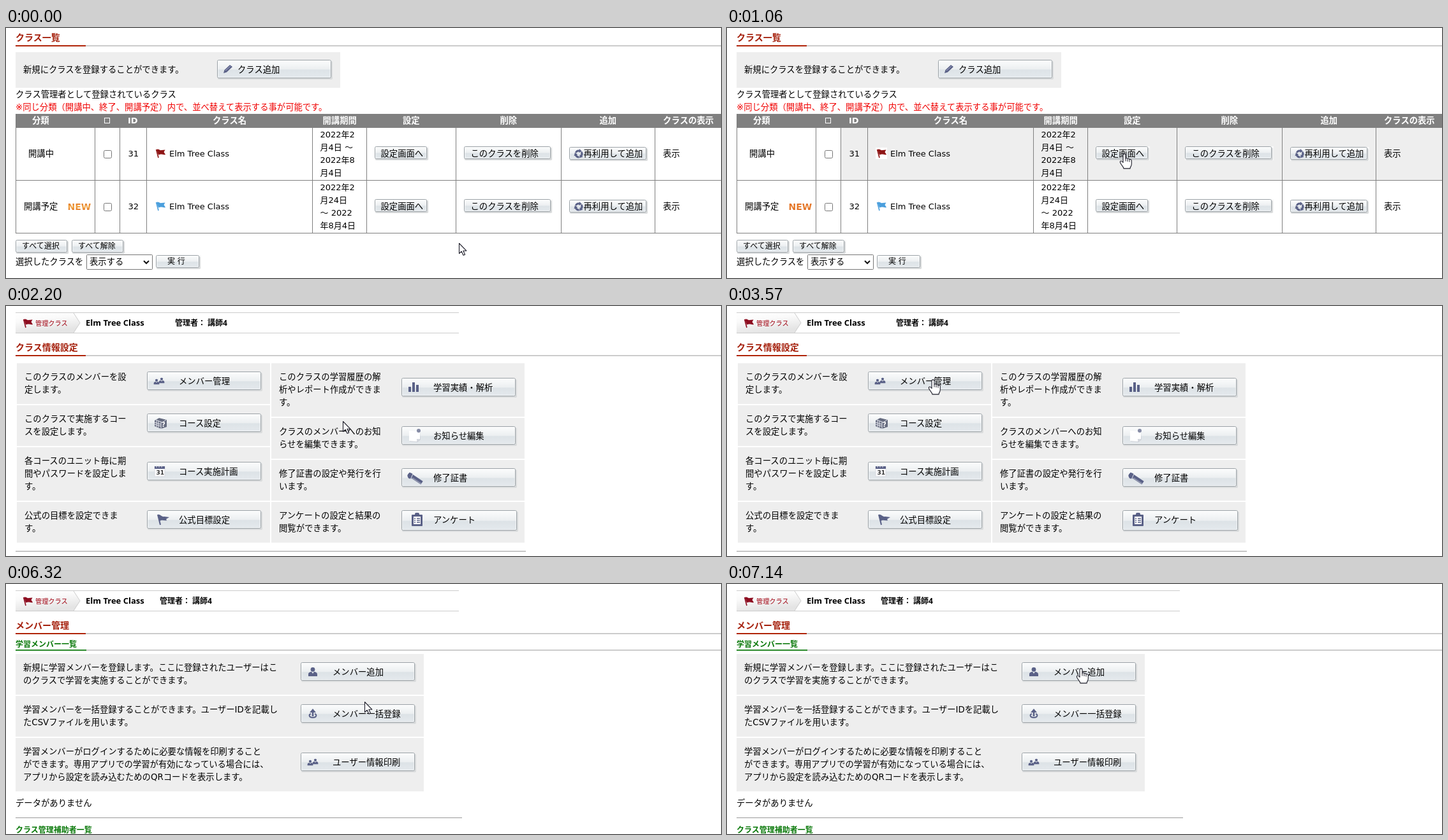
Animation of 1121 by 393 pixels, one loop 8 s. Source, as an HTML page:

```html
<!DOCTYPE html>
<html lang="ja">
<head>
<meta charset="utf-8">
<title>クラス管理</title>
<style>
html, body { margin: 0; width: 100%; height: 100%; overflow: hidden; background: #fff; }
svg { display: block; width: 1121px; height: 393px; }
text { font: 13.33px "DejaVu Sans", "Noto Sans CJK JP", "Noto Sans CJK", sans-serif; white-space: pre; }
.b { font-weight: 700; }
.t { font: 700 12px "Noto Sans", "Noto Sans CJK JP", "Noto Sans CJK", sans-serif; }
</style>
</head>
<body>
<svg id="stage" viewBox="0 0 1121 393" xmlns="http://www.w3.org/2000/svg"></svg>
<script>
const LOOP = 8000, INK = '#5a6187', RED = '#a5200c', GREEN = '#087808';
const CLASS_NAME = 'Elm Tree Class', TEACHER = '講師4';

// y is the vertical middle of the line
const text = (x, y, s, { size = 13.33, fill = '#000', cls = '' } = {}) =>
  `<text x="${x}" y="${y + size * .37}" class="${cls}" fill="${fill}" style="font-size:${size}px">${s}</text>`;
const lines = (x, y, ...rows) => rows.map((s, i) => text(x, y + i * 20, s)).join('');
const rect = (x, y, w, h, fill, extra = '') =>
  `<rect x="${x}" y="${y}" width="${w}" height="${h}" fill="${fill}" ${extra}/>`;
const path = (d, fill = INK, extra = '') => `<path d="${d}" fill="${fill}" ${extra}/>`;
const stroke = (d, color = INK, w = 1) => path(d, 'none', `stroke="${color}" stroke-width="${w}"`);
const circle = (x, y, r, fill = INK, extra = '') => `<circle cx="${x}" cy="${y}" r="${r}" fill="${fill}" ${extra}/>`;
const at = (x, y, body) => `<g transform="translate(${x} ${y})">${body}</g>`;
const group = (id, body) => `<g id="${id}">${body}</g>`;

const button = (x, y, w, h) =>
  rect(x + 1, y + 2, w + 1, h, '#d9dbdc', 'rx="2"') +
  rect(x + .5, y + .5, w - 1, h - 1, 'url(#face)', 'rx="2" stroke="#9aa1a6"') +
  rect(x + 1.5, y + 1.5, w - 3, h - 3, 'none', 'rx="1" stroke="#fff" stroke-opacity=".6"');
const smallButton = (x, y, w, label, tx, ty, size) =>
  rect(x, y, w + 3, 22, '#fafafa') + button(x, y, w, 20) + text(tx, ty, label, { size });
const flag = (x, y, color) => at(x, y,
  stroke('M.6 1L4 14', color, 1.6) + path('M1 1C4-1 6 3 9 2L14.5 1.5L12.5 5L15 9C11 10 9 7 4 9.5Z', color));
const heading = (y, s) => text(15, y, s, { size: 14, fill: RED, cls: 'b' }) +
  rect(125, y + 12, 996, 2, '#ccc') + rect(15, y + 12, 110, 2, '#b02408');

const person = (x, y, k = 1) => `<g transform="translate(${x} ${y}) scale(${k})">` +
  circle(0, -3.6, 3.4) + path('M-7 7V4C-7 1-4 0-2 0L0 3L2 0C4 0 7 1 7 4V7Z') + '</g>';
const people = (x, y) => person(x - 4, y + 1, .62) + person(x + 4, y - 1, .62);
const icons = {
  people, person,
  pencil: (x, y) => at(x, y, path('M-7 6L-5.5 1L3-7L7-4L-2 4.5Z') + stroke('M-4 2L4-5', '#aab0d0')),
  cube: (x, y) => at(x, y, path('M-7-4L0-8L12-5V6L3 9L-7 5Z', '#666c80') +
    stroke('M-7-1L3 2M-7 2L3 5M-4-4V6M-1-3V7M-5-5L5-1L11-5M3-2V9', '#e4e6ee') +
    text(4, 2.5, '?', { size: 10, fill: '#fff', cls: 'b' })),
  calendar: (x, y) => at(x, y, rect(-7, -8, 16, 16, '#fbfbfd', 'stroke="#ccced8" stroke-width=".6"') +
    rect(-7, -8, 16, 4, INK) + stroke('M-4-9V-6M0-9V-6M4-9V-6', '#dfe1ea') +
    text(-4.5, 2, '31', { size: 9, fill: '#333', cls: 'b' })),
  flag: (x, y) => at(x, y, stroke('M-2-8L2 8', INK, 2) + path('M-2-8C2-9 4-4 8-5L16-4L11-1L12 1C8 2 5-1 1 2Z')),
  bars: (x, y) => at(x, y, rect(-8, -1, 4, 8, INK) + rect(-2, -8, 4, 15, INK) + rect(4, -4, 4, 11, INK)),
  note: (x, y) => at(x, y, path('M-6-6L10-6L11 6L6 10L-6 9Z', '#b9bcc3', 'opacity=".5"') +
    path('M-7-8L10-7L10 5L5 9L-7 8Z', '#fff') + path('M5 9L5 5L10 5Z', '#d4d7df') + circle(8, -8, 3, '#858ba5')),
  scroll: (x, y) => at(x, y, stroke('M-8-6L13 8', INK, 6) + stroke('M-4-1L12 9.5', '#9298b0', 1.5) +
    circle(-5, -3, 4.5) + stroke('M-1-6L-5 3', '#dfe2ec')),
  clipboard: (x, y) => at(x + 5, y, rect(-8, -8, 17, 18, INK, 'rx="1"') + rect(-3, -11, 7, 5, INK, 'rx="2"') +
    rect(-5, -5, 11, 12, '#fff') + stroke('M-4-2H-2M0-2H5M-4 1H-2M0 1H5M-4 4H-2M0 4H5', INK, 1.6)),
  upload: (x, y) => at(x, y, path('M-5-2L0-8L5-2Z') + rect(-1.3, -3, 2.6, 7, INK) +
    stroke('M-3 0C-7 1-6 6 0 6C6 6 7 1 3 0', INK, 2)),
  recycle: (x, y) => at(x, y, [0, 120, 240].map(a => `<g transform="rotate(${a})">` +
    stroke('M-4.6-2A5 5 0 0 1 1-4.9', INK, 3) + path('M1-8L5-4L0-2Z') + '</g>').join(''))
};

// Class list
function listRow(y, id, status, sx, flagColor, dates) {
  const m = y + 41;
  return text(sx, m, status) + rect(153.5, m - 4.5, 12, 12, '#fff', 'rx="2" stroke="#767676"') +
    text(191.5, m, id, { size: 13 }) + rect(233, m - 9, 18, 18, '#fff') + flag(235, m - 7, flagColor) +
    text(256, m, CLASS_NAME, { size: 13 }) +
    dates.map((s, i) => text(492.5, y + 11 + i * 20, s, { size: 13 })).join('') +
    smallButton(578, y + 30, 82, '設定画面へ', 587.5, m) +
    smallButton(718, y + 30, 136, 'このクラスを削除', 728.5, m) +
    smallButton(883, y + 31, 121, '再利用して追加', 905.5, m) + icons.recycle(898, m + 1) +
    text(1030, m, '表示');
}
const heads = [[41, '分類'], [191, 'ID'], [324, 'クラス名'], [496.5, '開講期間'], [622, '設定'],
  [774.5, '削除'], [930.5, '追加'], [1030, 'クラスの表示']];
const listPage = heading(15, 'クラス一覧') + rect(15, 38, 509, 56, '#eee') +
  text(27, 65, '新規にクラスを登録することができます。') + button(331, 50, 179, 29) +
  icons.pencil(348, 65) + text(363, 65, 'クラス追加') +
  text(15, 104, 'クラス管理者として登録されているクラス') +
  text(15, 124, '※同じ分類（開講中、終了、開講予定）内で、並べ替えて表示する事が可能です。', { fill: '#f00000' }) +
  '<rect id="hover" x="179" width="942" height="82" fill="#eee"/>' +
  rect(15, 135, 1106, 22, '#808080') +
  heads.map(([x, s]) => text(x, 145, s, { fill: '#fff', cls: 'b', size: s === 'ID' ? 13 : 13.33 })).join('') +
  rect(154.5, 141.5, 8, 8, 'none', 'stroke="#fff"') +
  [15, 139, 178, 220, 480, 565, 705, 870, 1017].map(x => rect(x, 156, 1, 167, '#808080')).join('') +
  rect(15, 239, 1106, 1, '#808080') + rect(15, 322, 1106, 1, '#808080') +
  listRow(156, '31', '開講中', 35, '#8e1515', ['2022年2', '月4日 ～', '2022年8', '月4日']) +
  listRow(239, '32', '開講予定', 28, '#4b9fdd', ['2022年2', '月24日', '～ 2022', '年8月4日']) +
  text(96.5, 280.8, 'NEW', { size: 14, fill: 'url(#glow)', cls: 'b' }) +
  smallButton(15, 333, 81, 'すべて選択', 25, 343, 12) + smallButton(103, 333, 81, 'すべて解除', 113, 343, 12) +
  text(15, 367, '選択したクラスを') + rect(126.5, 356.5, 103, 23, '#fff', 'rx="1" stroke="#767676"') +
  text(131, 367, '表示する') + stroke('M216 366L220 370L224 366', '#111', 2) +
  smallButton(235, 357, 68, '実 行', 253, 367, 12);

// Shared top bar of both class pages
const topBar = adminX => rect(15, 10, 695, 1, '#ccc') + rect(15, 42, 695, 1, '#ccc') +
  path('M15 11H106L116 26.5L106 42H15Z', 'url(#tag)') + stroke('M106 11L116 26.5L106 42', '#ccc') +
  flag(27, 20, '#8d0d20') + text(46, 27, '管理クラス', { size: 10.2, fill: '#a00010' }) +
  text(125, 26.5, CLASS_NAME, { size: 13, cls: 't' }) + text(adminX, 26.5, '管理者： ' + TEACHER, { size: 12, cls: 't' });

// [cell top, cell height, label, icon, description lines]
const left = [
  [90, 64, 'メンバー管理', 'people', 'このクラスのメンバーを設', '定します。'],
  [156, 64, 'コース設定', 'cube', 'このクラスで実施するコー', 'スを設定します。'],
  [222, 84, 'コース実施計画', 'calendar', '各コースのユニット毎に期', '間やパスワードを設定しま', 'す。'],
  [308, 64, '公式目標設定', 'flag', '公式の目標を設定できま', 'す。']];
const right = [
  [90, 84, '学習実績・解析', 'bars', 'このクラスの学習履歴の解', '析やレポート作成ができま', 'す。'],
  [176, 64, 'お知らせ編集', 'note', 'クラスのメンバーへのお知', 'らせを編集できます。'],
  [242, 64, '修了証書', 'scroll', '修了証書の設定や発行を行', 'います。'],
  [308, 64, 'アンケート', 'clipboard', 'アンケートの設定と結果の', '閲覧ができます。']];
const members = [
  [110, 64, 'メンバー追加', 'person', '新規に学習メンバーを登録します。ここに登録されたユーザーはこ', 'のクラスで学習を実施することができます。'],
  [176, 64, 'メンバー一括登録', 'upload', '学習メンバーを一括登録することができます。ユーザーIDを記載し', 'たCSVファイルを用います。'],
  [242, 84, 'ユーザー情報印刷', 'people', '学習メンバーがログインするために必要な情報を印刷すること', 'ができます。専用アプリでの学習が有効になっている場合には、', 'アプリから設定を読み込むためのQRコードを表示します。']];

const buttonTop = ([y, h]) => y + (h - 38) / 2;
const cells = (rows, x, w, tx) => rows.map(([y, h, , , ...desc]) =>
  rect(x, y, w, h, '#eee') + lines(tx, y + 21, ...desc)).join('');
const faces = (rows, x) => rows.map(r => {
  const y = buttonTop(r), [w, h] = r[3] === 'clipboard' ? [181, 32] : [179, 29];
  return button(x, y, w, h) + icons[r[3]](x + 19, y + 15);
}).join('');
const labels = (rows, x) => rows.map(r => text(x + 50, buttonTop(r) + 15, r[2])).join('');

const setupPage = topBar(265) + heading(65, 'クラス情報設定') +
  cells(left, 17, 397, 29) + cells(right, 416, 397, 428) +
  group('faces', faces(left, 221) + faces(right, 620)) +
  labels(left, 221) + labels(right, 620) + rect(15, 385, 800, 1, '#999');

const memberPage = topBar(241) + heading(65, 'メンバー管理') +
  text(15, 95, '学習メンバー一覧', { size: 12, fill: GREEN, cls: 'b' }) +
  rect(126, 103, 995, 2, '#ccc') + rect(15, 103, 111, 2, '#2a8a2a') +
  cells(members, 15, 640, 27) + faces(members, 462) + labels(members, 462) +
  text(15, 344, 'データがありません') + rect(15, 367, 700, 1, '#999') +
  text(15, 387, 'クラス管理補助者一覧', { size: 12, fill: GREEN, cls: 'b' });

const outline = 'stroke="#1c1c28" stroke-width="1.1" stroke-linejoin="round"';
const arrow = path('M.5.5V16.5L4.2 13.2L7 19.3L9.6 18.2L6.9 12.2H11.8Z', '#fff', outline);
const hand = at(-1, -.5, path('M-2 2C-2-.2 2-.2 2 2V8C2 6.6 5 6.6 5 8.6C5 7.2 8 7.4 8 9.6C8 8.4 11.3 8.8 11.3 11V16' +
  'C11.3 20 9 20.5 9 23.4H-1C-1 20.5-6 17-6.6 13.6C-7 10.8-4 10.8-2 14Z', '#fff', outline) +
  stroke('M2 8V12M5 9V12.5M8 10V13', '#1c1c28', 1));

const stage = document.getElementById('stage');
stage.innerHTML = `<defs>
  <linearGradient id="face" x2="0" y2="1"><stop stop-color="#fcfdfd"/><stop offset=".5" stop-color="#eceff1"/>
    <stop offset=".55" stop-color="#dde3e7"/><stop offset="1" stop-color="#e4e9ed"/></linearGradient>
  <linearGradient id="tag" x2=".35" y2="1"><stop stop-color="#fff"/><stop offset=".4" stop-color="#fafafa"/>
    <stop offset="1" stop-color="#e4e4e4"/></linearGradient>
  <linearGradient id="glow" x2="0" y2="1"><stop stop-color="#d9621c"/><stop id="shine" offset=".5"/>
    <stop offset="1" stop-color="#d9621c"/></linearGradient></defs>` +
  rect(0, 0, 1121, 393, '#fff') + group('list', listPage) + group('setup', setupPage) + group('member', memberPage) +
  group('ring', circle(0, 0, 12, '#ff0', 'fill-opacity=".47"')) +
  group('cursor', group('arrow', arrow) + group('hand', hand));

const $ = id => document.getElementById(id);
const show = (id, on) => $(id).setAttribute('display', on ? 'inline' : 'none');
const move = (id, x, y) => $(id).setAttribute('transform', `translate(${x} ${y})`);

// Pointer moves: [first step, last step, number of steps, x, y]
const moves = [[80, 340, 4, 638, 220], [420, 580, 3, 624, 198], [1560, 1880, 5, 533, 182], [2200, 2200, 1, 528, 181],
  [2530, 2930, 6, 324, 116], [4780, 4780, 1, 350, 116], [4860, 5520, 9, 544, 135],
  [6320, 6320, 1, 562, 185], [6400, 7060, 9, 555, 124], [7140, 7140, 1, 556, 133]];

function pointer(t) {
  let x = 710, y = 338;
  for (const [t0, t1, n, tx, ty] of moves) {
    if (t < t0) break;
    const step = n > 1 ? Math.floor((t - t0) / (t1 - t0) * (n - 1) + 1e-6) + 1 : 1;
    const p = Math.min(1, step / n);
    x += (tx - x) * p;
    y += (ty - y) * p;
  }
  return [Math.round(x), Math.round(y)];
}

const inside = (x, y, bx, by, w, h) => x >= bx && x < bx + w && y >= by && y < by + h;
const overAny = (rows, bx, x, y) => rows.some(r => inside(x, y, bx, buttonTop(r), 179, 29));
function overLink(t, x, y) {
  if (t < 1300) return [186, 269].some(by => inside(x, y, 578, by, 82, 20));
  if (t < 4780) return overAny(left, 221, x, y) || overAny(right, 620, x, y);
  return overAny(members, 462, x, y);
}

function draw(t) {
  show('list', t < 1300);
  show('setup', t >= 1300 && t < 3730);
  show('faces', t >= 1400 && t < 3730);
  show('member', t >= 3730);

  const [x, y] = pointer(t), link = overLink(t, x, y);
  move('cursor', x, y);
  show('hand', link);
  show('arrow', !link);
  move('ring', x, y);
  show('ring', (t >= 980 && t < 1060) || (t >= 3490 && t < 3570));

  const row = y >= 157 && y < 239 ? 157 : y >= 240 && y < 322 ? 240 : 0;
  show('hover', t < 1300 && row);
  $('hover').setAttribute('y', row);

  const beat = Math.min(7, Math.floor((t + 60) / 160));
  const glow = .5 + .5 * Math.cos(beat * Math.PI / 2);
  $('shine').setAttribute('stop-color', `rgb(${224 + 20 * glow},${92 + 76 * glow},${32 + 36 * glow})`);
}

const start = performance.now();
(function tick() {
  draw((performance.now() - start) % LOOP);
  requestAnimationFrame(tick);
})();
</script>
</body>
</html>
```
